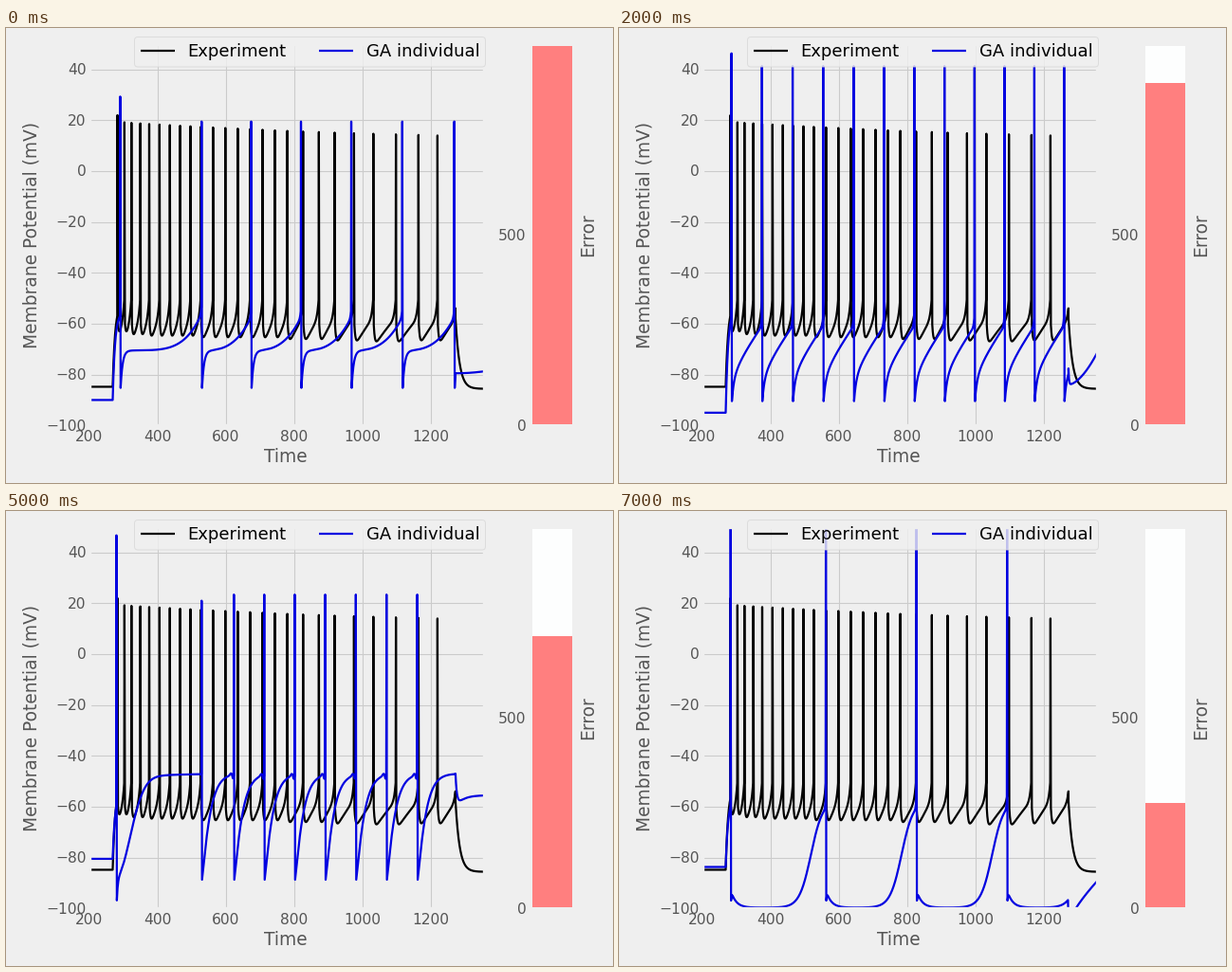
Recreate the animation shown at these times as a matplotlib script. Size 640 by 480 pixels, loop 8 s.

```python
import numpy as np
import matplotlib.pyplot as plt
from matplotlib.animation import FuncAnimation
from matplotlib.patches import FancyBboxPatch, Rectangle

W, H, DPI = 640, 480, 80
BG, GREY, BLUE = "#efefef", "#555555", "#0000e0"
LEFT, RIGHT, TOP, BOTTOM = 88, 503.6, 16.8, 419.26
X_SCALE = 0.36  # pixels per ms
Y_SCALE = (BOTTOM - TOP) / 150  # pixels per mV
ON, OFF, END = 268, 1272, 1360  # stimulus start, stimulus end, end of record
exp = np.exp


def trace(rest, threshold, spikes, peaks, shape, tail):
    """Voltage trace; the last spike time only shapes the final interval."""
    s = np.linspace(0, spikes[0] - ON - 0.5, 30)
    rise = (1 - exp(-s / 7)) / (1 - exp(-s[-1] / 7))
    t = [[150, ON], ON + s]
    v = [[rest, rest], rest + (threshold - rest) * rise]
    for a, b, peak in zip(spikes[:-1], spikes[1:], peaks):
        s = np.linspace(1.2, b - a - 0.8, 120)
        t += [[a], a + s]
        v += [[peak], shape(s, b - a, a)]
    t, v = np.concatenate(t), np.concatenate(v)
    keep = t < OFF
    s = np.linspace(0, END - OFF, 120)
    return np.append(t[keep], OFF + s), np.append(v[keep], tail(s))


def wave(base, fall, tau_fall, ramp, power, up, tau_up):
    """Recovery after a spike, slow ramp, then take-off into the next one."""
    def shape(s, n, start):
        return (base + fall * exp(-s / tau_fall) + ramp * (s / n) ** power
                + up * exp(-(n - s) / tau_up))
    return shape


def experiment():
    # Key spikes; the ones between are evenly spaced
    index = [0, 2, 4, 9, 11, 16, 19, 21, 23, 25]
    times = [282, 323, 375, 526, 598, 779.5, 918, 1031.5, 1163.5, 1275]
    spikes = np.interp(np.arange(26), index, times)
    peaks = np.append(22, np.linspace(19.2, 14, 24))
    return trace(-84.8, -57, spikes, peaks,
                 wave(-71, 14, 3.2, 13, 0.7, 9, 4.5),
                 lambda s: -85.6 + 27.8 * exp(-s / 12))


def slow_firing():
    first = wave(-70.5, -18, 6, 14.5, 5, 4, 2)
    later = wave(-70.5, -18, 6, 13, 3, 4, 2)

    def shape(s, n, start):
        return (first if start < 300 else later)(s, n, start)
    k = np.arange(7)
    spikes = np.append(290, 528.5 + 145 * k + 0.12 * k ** 3)
    return trace(-90, -57, spikes, [29.3] + [19.5] * 6, shape,
                 lambda s: -79.5 + 0.7 * (s / 80) ** 2)


def regular_firing():
    k = np.arange(12)
    spikes = np.append(285, 374.2 + 88.5 * k + 0.15 * k * (10 - k))
    return trace(-95, -58, spikes, [46.3] + [41.3] * 11,
                 wave(-84, -9, 6, 23, 0.75, 5, 2),
                 lambda s: -84 + 11.3 * (s / 79) ** 1.7 + 6.4 * exp(-s / 1.5))


def plateau_firing():
    def shape(s, n, start):
        if start < 300:
            return (-47 - 38 * exp(-(s / 57) ** 2) - 2.5 * exp(-s / 100)
                    - 14 * exp(-s / 3))
        left = n - s
        notch = 0.8 * exp(-((left - 9) / 4) ** 2) - 1.4 * exp(-((left - 3) / 2) ** 2)
        return -47 - 43 * exp(-(s / 25) ** 1.15) + notch
    k = np.arange(7)
    spikes = np.concatenate([[279, 528.5], 623 + 88.8 * k + 0.12 * k ** 2, [1300]])
    return trace(-80.5, -60, spikes, [46.7, 21] + [23.4] * 7, shape,
                 lambda s: -55.5 - 4.5 * exp(-s / 22) + 13 * exp(-s / 4))


def fast_firing():
    def shape(s, n, start):
        base = -55.5 + 0.0075 * (min(start, 1040) - 300) - 3 * (start > 1050)
        return wave(base, 10, 5, 1, 1, 12, 6)(s, n, start)
    # A train whose period shrinks and grows again, then pairs of spikes
    u = np.linspace(0, 1, 36)
    train = 305.5 + 736 * (u + 0.2 * ((u - 0.3) ** 3 + 0.027 - 0.37 * u))
    k = np.arange(5)
    pairs = 1084 + 36.7 * k + 1.1 * k * (k - 1)
    pairs = np.column_stack([pairs, pairs + 7.2]).ravel()
    spikes = np.concatenate([[280], train, [1057], pairs, [1300]])
    peaks = np.concatenate([[28.5], np.linspace(-7.6, -10, 36), [-19], [-9.3, -25] * 5])
    return trace(-83, -56, spikes, peaks, shape,
                 lambda s: -59.1 - 3 * exp(-s / 10) + 13 * exp(-s / 2))


def rare_firing():
    def shape(s, n, start):
        left = n - s
        return (-99.7 + 42 / (1 + exp((left - 43.5) / 17)) + 5 * exp(-left / 1.5)
                + 7 * exp(-s / 15) - 10 * exp(-s / 1.2))
    spikes = np.append(282.5, 561.4 + 265.4 * np.arange(4))
    return trace(-83.7, -60, spikes, [60] * 4, shape,
                 lambda s: -106 + 16 * (s / 79) ** 0.75)


fig = plt.figure(figsize=(W / DPI, H / DPI), dpi=DPI, facecolor=BG)

ax = fig.add_axes([LEFT / W, 1 - BOTTOM / H, (RIGHT - LEFT) / W, (BOTTOM - TOP) / H],
                  facecolor=BG)
ax.set_xlim(200, 200 + (RIGHT - LEFT) / X_SCALE)
ax.set_ylim(-100, 50)
ax.set_xticks(range(200, 1201, 200))
ax.set_yticks(range(-100, 41, 20))
ax.tick_params(length=0, labelbottom=False, labelleft=False)
ax.grid(color="#cbcbcb", lw=1)
ax.set_axisbelow(True)
for spine in ax.spines.values():
    spine.set(color=BG, linewidth=3)
ax.plot(*experiment(), color="black", lw=2)
individual, = ax.plot([], [], color=BLUE, lw=2)

# Pixel-space layer for labels, legend and error bar
page = fig.add_axes([0, 0, 1, 1], zorder=5)
page.set(xlim=(0, W), ylim=(H, 0))
page.axis("off")


def put(x, y, text, size=14, color=GREY, ha="center", va="baseline", rotation=0):
    page.text(x, y, text, fontsize=size, color=color, ha=ha, va=va,
              rotation=rotation, family="DejaVu Sans")


for time in range(200, 1201, 200):
    put(LEFT + (time - 200) * X_SCALE, 435.5, str(time))
for mv in range(-100, 41, 20):
    y = BOTTOM - (mv + 100) * Y_SCALE
    put(84.5, y + 5.5, str(mv).replace("-", "\u2212"), ha="right")
for error in (0, 500):
    put(548.4, BOTTOM + 5.5 - error * 0.15 * Y_SCALE, str(error), ha="right")
put(295, 458, "Time", 16.8)
put(27, 218.5, "Membrane Potential (mV)", 16.8, va="center", rotation=90)
put(613.4, 218.5, "Error", 16.8, va="center", rotation=90)

page.add_patch(FancyBboxPatch((138.5, 12.5), 364, 25.5,
                              boxstyle="round,pad=3,rounding_size=3.5",
                              fc="#f0f0f0", ec="#d8d8d8", lw=0.9, alpha=0.8))
for x, color, name in [(142, "black", "Experiment"), (330, BLUE, "GA individual")]:
    page.plot([x, x + 36], [24, 24], color=color, lw=2, solid_capstyle="butt")
    put(x + 49.5, 30, name, 16.2, "black", "left")

BAR_X, BAR_W, BAR_TOP, BAR_END = 555.3, 42, 19, 418
page.add_patch(Rectangle((BAR_X, BAR_TOP), BAR_W, BAR_END - BAR_TOP, fc="#fdfefe", lw=0))
bar = page.add_patch(Rectangle((BAR_X, BAR_END), BAR_W, 0, fc="#ff7f7f", lw=0))

# Best individual of each generation: trace and error
best = [(slow_firing(), 1000), (regular_firing(), 897), (plateau_firing(), 714),
        (fast_firing(), 692), (rare_firing(), 277)]
generations = np.repeat(np.arange(5), [1, 2, 3, 1, 1])


def update(i):
    data, error = best[generations[i]]
    individual.set_data(*data)
    top = max(BAR_TOP, BOTTOM - error * 0.15 * Y_SCALE)
    bar.set_y(top)
    bar.set_height(BAR_END - top)
    return individual, bar


anim = FuncAnimation(fig, update, frames=len(generations), interval=1000,
                     repeat=True, repeat_delay=0)
plt.show()
```
